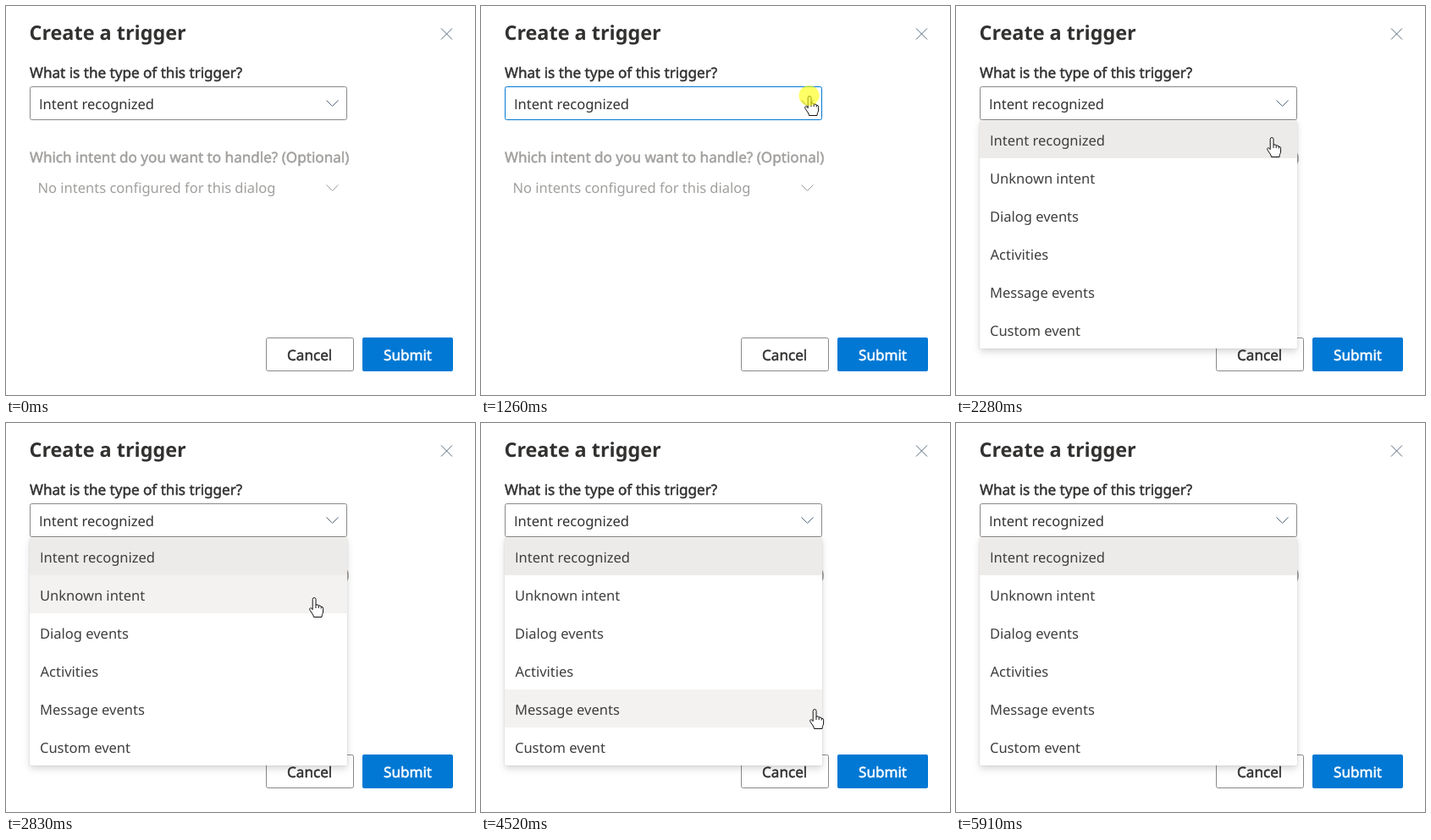
Recreate the animation shown at these times as an HTML page. Size 554 px wide and 460 px high, loop 7 s.

```html
<!DOCTYPE html>
<html lang="en">
<head>
<meta charset="utf-8">
<title>Create a trigger</title>
<style>
  html, body { margin: 0; width: 100%; height: 100%; overflow: hidden; background: #fff; }
  svg { display: block; font: 16.5px "Noto Sans", "Open Sans", sans-serif; fill: #323130; text-rendering: geometricPrecision; }
  .cap { font-family: "Open Sans", sans-serif; }
  /* A thin outline gives a weight between regular and bold */
  .semi { font-size: 17.1px; stroke: #323130; stroke-width: .5; }
  .off { fill: #a19f9d; }
  .semi.off { stroke: #a19f9d; }
  .semi.light { fill: #fff; stroke: #fff; }
  .line { fill: none; stroke: #56687a; }
  .menu { fill: #3f3e3d; }
  .sheet { fill: #fff; filter: drop-shadow(0 4px 4.5px rgba(0,0,0,.14)) drop-shadow(0 .75px 1.2px rgba(0,0,0,.12)); }
  .cursor { fill: #fff; stroke: #111; stroke-linejoin: round; }
</style>
</head>
<body>
<svg width="554" height="460" viewBox="0 0 554 460">
  <text x="27.5" y="40" font-size="23.4" font-weight="700">Create a trigger</text>
  <path class="line" d="M514 26.5l13 13m0-13l-13 13"/>

  <text class="semi" x="28" y="85">What is the type of this trigger?</text>
  <rect id="box" x="28.5" y="95.5" width="374" height="39" rx="2" fill="#fff" stroke="#8a8886"/>
  <text x="39" y="122"><tspan class="cap">I</tspan>ntent recognized</text>
  <path class="line" d="M378.5 111.5l7 7 7-7"/>

  <text class="semi off" x="28" y="185">Which intent do you want to handle? (Optional)</text>
  <text class="off" x="37.5" y="221">No intents configured for this dialog</text>
  <path class="line" style="stroke:#a19f9d" d="M378.5 211.5l7 7 7-7"/>

  <rect x="307.5" y="392.5" width="103" height="39" rx="2" fill="#fff" stroke="#8a8886"/>
  <text class="semi" x="332" y="418.5">Cancel</text>
  <rect x="421" y="392" width="107" height="40" rx="2" fill="#0078d4"/>
  <text class="semi light" x="446" y="418.5">Submit</text>

  <g id="menu" class="menu">
    <rect class="sheet" x="28" y="135" width="375" height="270" rx="2"/>
    <rect x="28" y="135.5" width="375" height="44.5" fill="#edebe9"/>
    <rect id="hover" x="28" width="375" height="45" fill="#f3f2f1"/>
    <text x="40" y="165"><tspan class="cap">I</tspan>ntent recognized</text>
    <text x="40" y="210">Unknown intent</text>
    <text x="40" y="255">Dialog events</text>
    <text x="40.5" y="300">Activities</text>
    <text x="40" y="345">Message events</text>
    <text x="40" y="390">Custom event</text>
  </g>

  <g id="cursor" class="cursor">
    <path id="arrow" d="M.5 .5V16l3.7-3.4 2.4 5.6 2.4-1-2.4-5.4h5Z"/>
    <g id="hand">
      <path d="M-1.8 2.5a1.9 1.9 0 0 1 3.8 0V9q2.8-.8 3.2 1 2.6-.6 3 1.2 2.4-.2 2.4 2V17q0 2-1.2 3.6L9 23.5H-.5L-1.2 21-5 15.3q-1-2 .6-2.6 1-.3 2.6 2Z"/>
      <path fill="none" d="M2 9v4M5.2 10v3M8.2 11.2v2.3"/>
    </g>
  </g>
  <circle id="glow" cx="387.5" cy="106" r="12" fill="#ff0" fill-opacity=".6"/>
</svg>
<script>
const LOOP = 7000, STEP = 76.7;
const el = id => document.getElementById(id);
const show = (id, on) => el(id).style.display = on ? '' : 'none';
const linear = p => p;
const easeOut = p => Math.sin(p * Math.PI / 2);

// Each leg moves the pointer in ten steps: start time, end point, easing
const origin = [512, 483];
const legs = [
  [110, 388, 106, linear],
  [1900, 363, 187, linear],
  [2680, 366, 251, linear],
  [3600, 400, 324, easeOut],
  [4370, 380, 369, linear],
  [5140, 517, 444, linear]
];

// Progress from 0 to 1 in a number of equal steps
function stepped(t, start, count) {
  const n = Math.floor((t - start + 5) / STEP) + 1;
  return t < start ? 0 : Math.min(1, n / count);
}

function pointer(t) {
  let [x, y] = origin;
  for (const [start, tx, ty, ease] of legs) {
    const p = ease(stepped(t, start, 10));
    x += (tx - x) * p;
    y += (ty - y) * p;
  }
  return [x, y];
}

function draw(t) {
  const [x, y] = pointer(t);
  const open = stepped(t, 1430, 4);
  const hand = t >= 880 && x < 404;
  const overBox = x < 403 && y > 95 && y < 135;

  show('cursor', t >= 110 && t < 5910);
  show('hand', hand);
  show('arrow', !hand);
  el('cursor').setAttribute('transform', `translate(${Math.round(x)} ${Math.round(y)})`);

  el('box').setAttribute('stroke', !overBox ? '#8a8886' : t < 1260 ? '#323130' : '#0078d4');
  el('glow').setAttribute('opacity', t < 1260 ? 0 : 1 - open);

  const slide = -10 * (1 - open) ** 2;
  el('menu').setAttribute('opacity', open);
  el('menu').setAttribute('transform', `translate(0 ${slide})`);

  const row = Math.floor((y - 135) / 45);
  show('hover', row > 0 && row < 6 && x < 410);
  el('hover').setAttribute('y', 135 + row * 45);
}

const begin = performance.now();
function tick() {
  draw((performance.now() - begin) % LOOP);
  requestAnimationFrame(tick);
}
tick();
</script>
</body>
</html>
```
